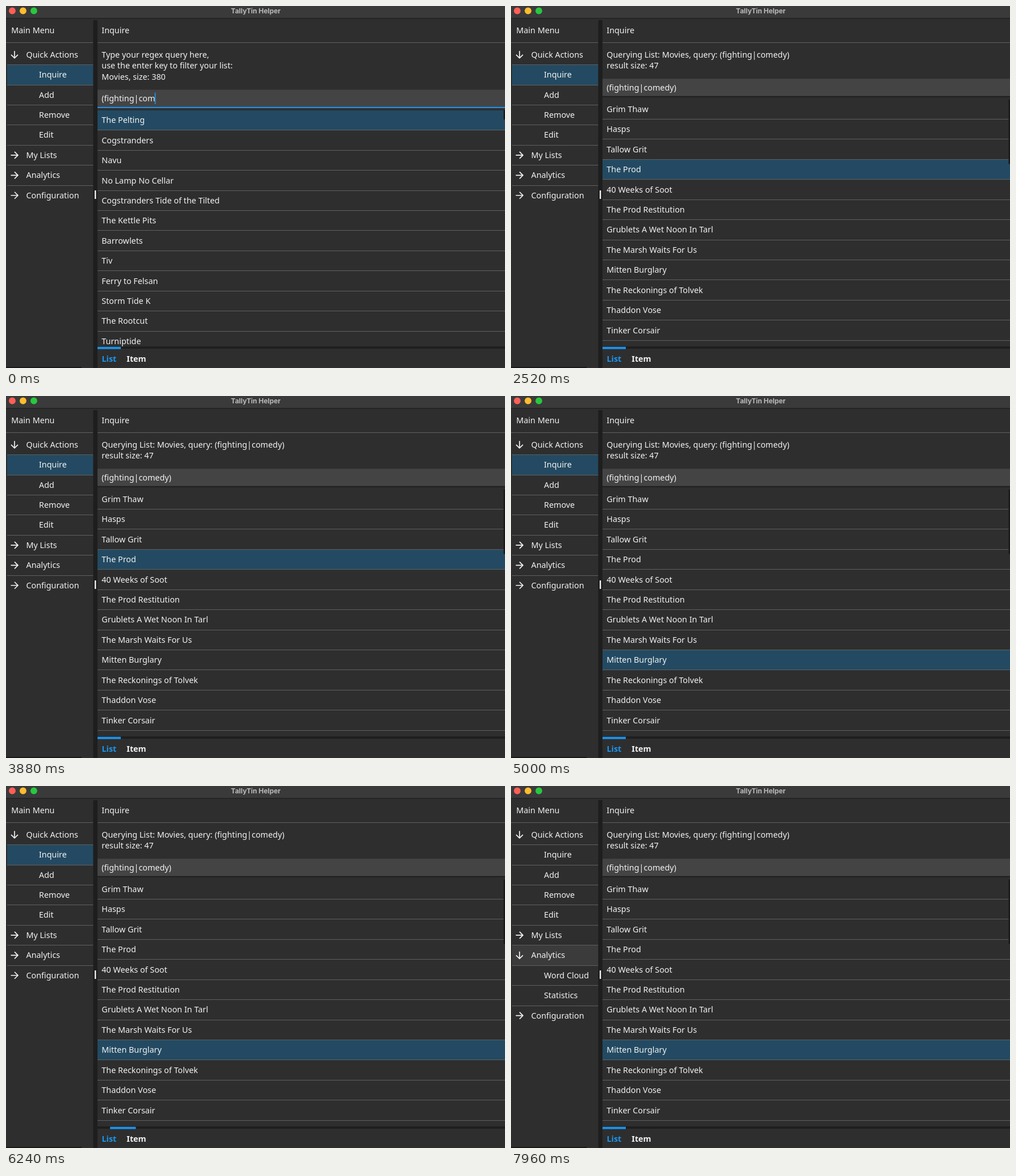
An HTML page with a canvas that plays this animation: 878 by 638 pixels, repeating every 8 s.

```html
<!DOCTYPE html>
<html lang="en">
<head>
<meta charset="utf-8">
<title>TallyTin Helper</title>
<style>
html, body { margin: 0; width: 100%; height: 100%; overflow: hidden; background: #2e2e2e; }
canvas { display: block; }
</style>
</head>
<body>
<canvas id="stage" width="878" height="638"></canvas>
<script>
const ctx = document.getElementById('stage').getContext('2d');
const W = 878, H = 638, LOOP = 8000, PITCH = 35.42, LINE = 19.35;
const SANS = '"Noto Sans", "Open Sans", sans-serif';
const BODY = '14.35px ' + SANS, BOLD = 'bold 14.35px ' + SANS;
const TITLE = 'bold 11.9px Inter, Roboto, sans-serif';
const C = {
  bg: '#2e2e2e', bar: '#3a3a3a', dark: '#1e1e1e', rule: '#606060', entry: '#444444',
  blue: '#1c95ee', select: '#234a62', hover: '#3b3b3b', text: '#f2f2f2'
};

const allFilms = ['The Pelting', 'Cogstranders', 'Navu', 'No Lamp No Cellar',
  'Cogstranders Tide of the Tilted', 'The Kettle Pits', 'Barrowlets', 'Tiv',
  'Ferry to Felsan', 'Storm Tide K', 'The Rootcut', 'Turniptide'];
const foundFilms = ['Grim Thaw', 'Hasps', 'Tallow Grit', 'The Prod', '40 Weeks of Soot',
  'The Prod Restitution', 'Grublets A Wet Noon In Tarl', 'The Marsh Waits For Us',
  'Mitten Burglary', 'The Reckonings of Tolvek', 'Thaddon Vose', 'Tinker Corsair'];
const details = {
  3: ['4', 'action fighting'],
  8: ['4', 'owen tambler campy comedy']
};
const quick = ['Inquire', 'Add', 'Remove', 'Edit'];
const copyIcon = new Path2D('M16 1H4C2.9 1 2 1.9 2 3v14h2V3h12V1z' +
  'M19 5H8c-1.1 0-2 .9-2 2v14c0 1.1.9 2 2 2h11c1.1 0 2-.9 2-2V7c0-1.1-.9-2-2-2z' +
  'm0 16H8V7h11v14z');

// Timeline: [start, value] pairs in ms.
const typed = [[0, 13], [80, 14], [320, 15], [520, 16], [840, 17]];
const selection = [[0, 0], [1720, 1], [2040, 2], [2360, 3],
  [4000, 4], [4120, 5], [4240, 6], [4360, 7], [4480, 8]];
const tabs = [[0, 0], [3000, 1], [3760, 0], [5240, 1], [6240, 0]];
const hovers = [[0, -1], [6440, 2], [6520, 3], [6600, 4], [6680, 5], [6760, 6]];
const QUERY_AT = 1160, BLUR_AT = 1720, EXPAND_AT = 7400;

const stepAt = (track, t) => track.filter(s => s[0] <= t).pop();
const valueAt = (track, t) => stepAt(track, t)[1];

function rect(x, y, w, h, color) {
  ctx.fillStyle = color;
  ctx.fillRect(x, y, w, h);
}

// Text placed by the vertical middle of its capitals.
function text(str, x, mid, font = BODY, color = C.text) {
  ctx.font = font;
  ctx.fillStyle = color;
  ctx.fillText(str, x, mid + 5);
}

function rule(x, y, w) {
  rect(x, Math.round(y - 0.5), w, 1, C.rule);
}

function arrow(y, down) {
  ctx.save();
  ctx.translate(15, y);
  if (down) ctx.rotate(Math.PI / 2);
  ctx.strokeStyle = C.text;
  ctx.lineWidth = 1.7;
  ctx.beginPath();
  ctx.moveTo(-6.5, 0);
  ctx.lineTo(5.6, 0);
  ctx.moveTo(0, -6);
  ctx.lineTo(6, 0);
  ctx.lineTo(0, 6);
  ctx.stroke();
  ctx.restore();
}

function drawTitleBar() {
  rect(0, 0, W, 22, C.bar);
  rect(0, 21, W, 1.5, '#202020');
  ['#ff5f57', '#febc2e', '#28c840'].forEach((color, i) => {
    ctx.fillStyle = color;
    ctx.beginPath();
    ctx.arc(11 + 19 * i, 8.5, 5.9, 0, Math.PI * 2);
    ctx.fill();
  });
  ctx.textAlign = 'center';
  text('TallyTin Helper', 439.5, 7.5, TITLE, '#bababa');
  ctx.textAlign = 'left';
}

function drawSidebar(t) {
  const open = t >= EXPAND_AT;
  const rows = [
    { label: 'Quick Actions', open: true },
    ...quick.map(label => ({ label, leaf: true })),
    { label: 'My Lists' },
    { label: 'Analytics', open },
    ...(open ? ['Word Cloud', 'Statistics'] : []).map(label => ({ label, leaf: true })),
    { label: 'Configuration' }
  ];
  const hover = valueAt(hovers, t);
  text('Main Menu', 9.3, 43);
  rule(0, 64.5, 153);
  rows.forEach((row, i) => {
    const mid = 85.8 + PITCH * i, top = mid - 17.2;
    if (i === 1 && !open) rect(2, top, 151.5, PITCH, C.select);
    else if (i === hover) rect(2, top, 151.5, PITCH, C.hover);
    if (!row.leaf) arrow(mid, row.open);
    text(row.label, row.leaf ? 58 : 35.5, mid);
  });
  for (let i = 1; i < rows.length; i++) rule(2, 68.3 + PITCH * i, 151.5);
  rect(0, 636, 133, 2, '#181818');
  rect(153.5, 25, 7.5, H - 25, C.dark);
  rect(156, 325, 2.4, 15, '#f0f0f0');
}

function drawEntry(t, y) {
  const focused = t < BLUR_AT;
  const value = '(fighting|comedy)'.slice(0, valueAt(typed, t));
  rect(161, y, W - 161, 31, C.entry);
  text(value, 168.3, y + 15.4);
  if (focused) {
    rect(161, y + 30.3, W - 161, 2.1, C.blue);
    rect(168.3 + ctx.measureText(value).width - 0.7, y + 5, 1.7, 20.5, C.blue);
  } else {
    rect(161, y + 30.5, W - 161, 2, C.dark);
  }
}

function drawList(films, top, selected, thumb) {
  ctx.save();
  ctx.beginPath();
  ctx.rect(161, top, W - 161, 600 - top);
  ctx.clip();
  rect(161, top + PITCH * selected, W - 161, PITCH, C.select);
  films.forEach((name, i) => {
    text(name, 168.3, top + 17.4 + PITCH * i);
    rule(161, top + PITCH * (i + 1) - 0.4, W - 161);
  });
  rect(875.5, top, 2.5, thumb, '#191919');
  ctx.restore();
}

function drawItem(index) {
  const [rating, tags] = details[index] || details[8];
  rect(162.5, 165.5, 32, 33, '#252525');
  rect(164, 166.5, 29, 30.5, '#303030');
  ctx.save();
  ctx.translate(168.3, 171.7);
  ctx.scale(0.85, 0.85);
  ctx.fillStyle = C.text;
  ctx.fill(copyIcon, 'evenodd');
  ctx.restore();
  ['Name:', foundFilms[index], '', 'Rating:', rating, '', 'Tags:', tags]
    .forEach((line, i) => text(line, 206, 182 + LINE * i));
}

function drawTabs(t) {
  const [start, active] = stepAt(tabs, t);
  const moved = start ? Math.min(1, (t - start + 40) / 80) : 1;
  const k = active ? moved : 1 - moved;
  rect(161, 600, W - 161, 4, C.dark);
  rect(161 + 44.3 * k, 600.7, 41 + 8.5 * k, 3.9, C.blue);
  text('List', 168.5, 622, BOLD, active ? C.text : C.blue);
  text('Item', 212.3, 622, BOLD, active ? C.blue : C.text);
}

function drawMain(t) {
  const queried = t >= QUERY_AT;
  const lines = queried
    ? ['Querying List: Movies, query: (fighting|comedy)', 'result size: 47']
    : ['Type your regex query here,', 'use the enter key to filter your list:', 'Movies, size: 380'];
  const y = 89.8 + LINE * lines.length;
  const selected = valueAt(selection, t);
  text('Inquire', 168.3, 43);
  rule(161, 64.5, W - 161);
  lines.forEach((line, i) => text(line, 168.3, 86 + LINE * i));
  drawEntry(t, y - 0.3);
  if (valueAt(tabs, t)) drawItem(selected);
  else drawList(queried ? foundFilms : allFilms, y + 36, selected, queried ? 114 : 16);
  drawTabs(t);
}

function draw(now) {
  const t = now % LOOP;
  rect(0, 0, W, H, C.bg);
  drawTitleBar();
  drawSidebar(t);
  drawMain(t);
}

let origin = null;
function frame(now) {
  if (origin === null) origin = now;
  draw(now - origin);
  requestAnimationFrame(frame);
}
draw(0);
requestAnimationFrame(frame);
</script>
</body>
</html>
```
